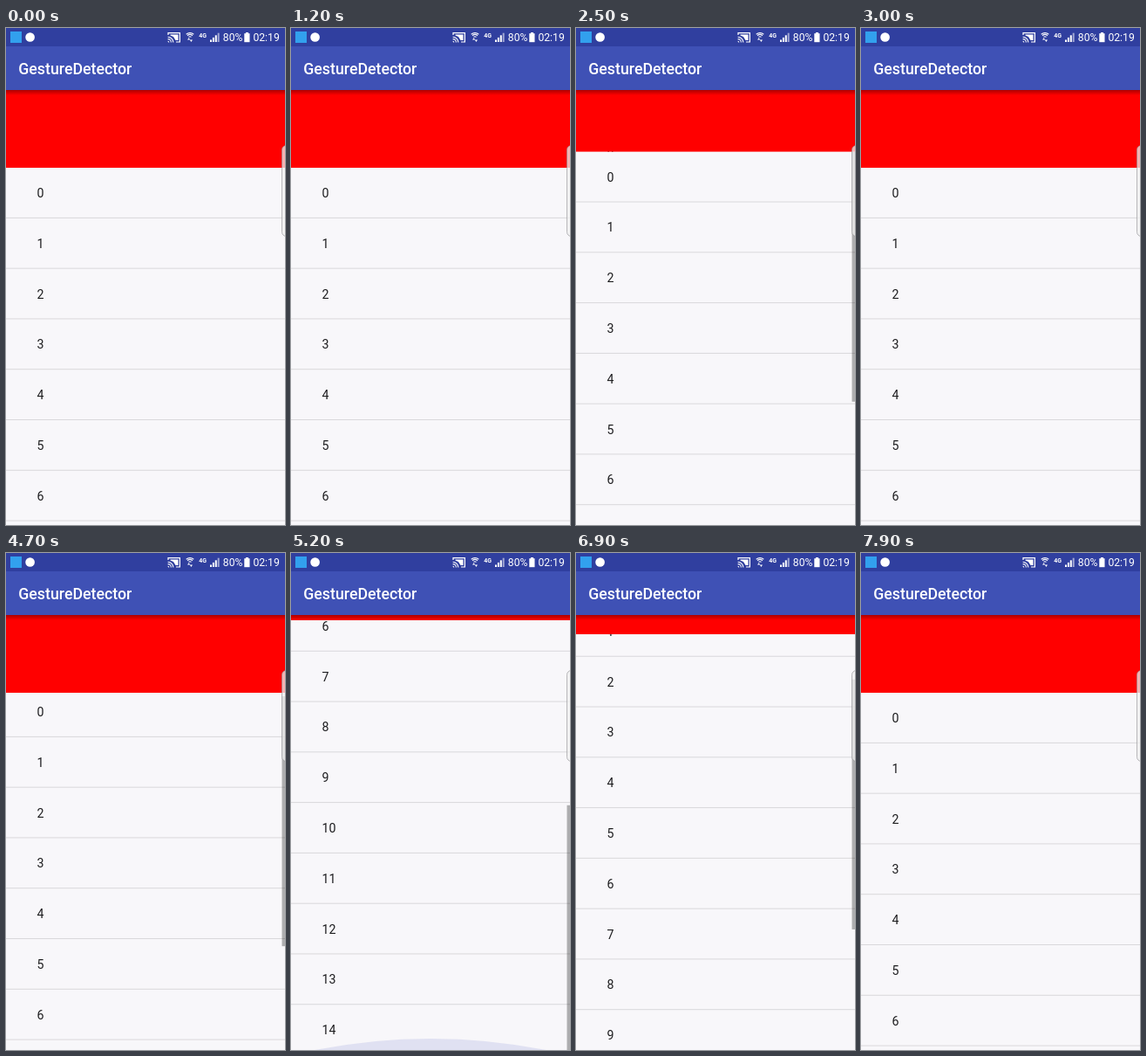
Write an HTML page with a canvas that moves like this. It is 320 px wide and 569 px high and loops after 8000 ms.

```html
<!DOCTYPE html>
<html lang="en">
<head>
<meta charset="utf-8">
<title>Collapsing header</title>
<style>
html, body { margin: 0; width: 100%; height: 100%; overflow: hidden; background: #f8f7fa; }
canvas { display: block; }
</style>
</head>
<body>
<canvas id="stage" width="320" height="569"></canvas>
<script>
const ctx = document.getElementById('stage').getContext('2d');
const W = 320, H = 569, LOOP = 8000, STEP = 100;
const BAR = 71, OPEN = 160, ROW = 57.78, ROWS = 15;
const VIEW = H - BAR, CONTENT = ROW * ROWS, MAX = CONTENT - VIEW;

const linear = p => p;
const smooth = p => (1 - Math.cos(Math.PI * p)) / 2;

// Each key is [time, value]
const HEADER = [[1255, OPEN], [1755, BAR], [2150, BAR], [2650, OPEN],
  [4783, OPEN], [5283, BAR], [6734, BAR], [7234, OPEN]];
const SCROLL = [[1650, 0], [2000, 60], [2120, 60], [2350, 0],
  [4650, 0], [4700, 7], [4800, 60], [4900, 150], [5000, 260], [5100, 345], [5150, MAX],
  [6650, MAX], [6700, 360], [6800, 240], [6900, 90], [7000, 0]];
const THUMB = [[1200, 0], [1300, 1], [2650, 1], [2900, 0], [4650, 0], [4700, 1],
  [5700, 1], [5950, 0], [6650, 0], [6700, 1], [7580, 1], [7830, 0]];
const GLOW_BOTTOM = [[5140, 0], [5200, 1], [5300, 1.3], [5850, 0]];
const GLOW_TOP = [[6980, 0], [7100, 1], [7500, 0]];

function track(keys, t, ease = linear) {
  const i = keys.findIndex(k => k[0] > t);
  if (i === 0) return keys[0][1];
  if (i < 0) return keys[keys.length - 1][1];
  const [t0, a] = keys[i - 1], [t1, b] = keys[i];
  return a + (b - a) * ease((t - t0) / (t1 - t0));
}

function rect(x, y, w, h, color) {
  ctx.fillStyle = color;
  ctx.fillRect(x, y, w, h);
}

function text(str, x, y, font, color = '#fff') {
  ctx.font = font + ' Roboto, sans-serif';
  ctx.fillStyle = color;
  ctx.fillText(str, x, y);
}

function arc(x, y, r, from, to, width) {
  ctx.beginPath();
  ctx.arc(x, y, r, from, to);
  ctx.strokeStyle = '#fff';
  ctx.lineWidth = width;
  ctx.stroke();
}

function polygon(color, ...points) {
  ctx.beginPath();
  points.forEach(p => ctx.lineTo(...p));
  ctx.fillStyle = color;
  ctx.fill();
}

function glow(y, direction, amount) {
  if (amount <= 0) return;
  ctx.beginPath();
  ctx.moveTo(0, y);
  ctx.quadraticCurveTo(W / 2, y + direction * 38 * amount, W, y);
  ctx.fillStyle = `rgba(63,81,181,${0.13 * Math.min(1, amount)})`;
  ctx.fill();
}

function list(t) {
  const top = track(HEADER, t, smooth), scroll = track(SCROLL, t);
  rect(0, BAR, W, top - BAR, '#f00');
  ctx.save();
  ctx.beginPath();
  ctx.rect(0, top, W, H - top);
  ctx.clip();
  rect(0, top, W, H, '#f8f7fa');
  for (let i = 0; i < ROWS; i++) {
    const y = top - scroll + i * ROW;
    text(i, 35.6, y + 34, '14.2px', '#1c1c1e');
    rect(0, y + ROW - 0.9, W, 1, '#d9d8db');
  }
  glow(top + VIEW, -1, track(GLOW_BOTTOM, t));
  glow(top, 1, track(GLOW_TOP, t));
  const scale = VIEW / CONTENT;
  rect(316.5, top + scroll * scale, 3.5, VIEW * scale, `rgba(0,0,0,${0.3 * track(THUMB, t)})`);
  ctx.restore();
}

function edgeHandle() {
  ctx.beginPath();
  ctx.roundRect(316.5, 134.5, 12, 104, 5);
  ctx.fillStyle = 'rgba(240,240,241,.75)';
  ctx.fill();
  ctx.strokeStyle = 'rgba(150,150,152,.65)';
  ctx.lineWidth = 1;
  ctx.stroke();
}

function appBar() {
  const shadow = ctx.createLinearGradient(0, BAR, 0, BAR + 6);
  shadow.addColorStop(0, 'rgba(0,0,0,.32)');
  shadow.addColorStop(1, 'rgba(0,0,0,0)');
  rect(0, BAR, W, 6, shadow);
  rect(0, 21, W, BAR - 21, '#3f51b5');
  text('GestureDetector', 14.2, 53, '500 17.78px');
}

function statusBar() {
  rect(0, 0, W, 21, '#303f9f');
  rect(5, 4, 13, 13, '#32a0ee');
  ctx.beginPath();
  ctx.arc(27.6, 10.5, 5.3, 0, 7);
  ctx.fillStyle = '#fff';
  ctx.fill();

  // Cast
  ctx.strokeStyle = '#fff';
  ctx.lineWidth = 1.2;
  ctx.beginPath();
  [[186, 8], [186, 5.6], [199.4, 5.6], [199.4, 16], [195, 16]].forEach(p => ctx.lineTo(...p));
  ctx.stroke();
  polygon('#fff', [188.5, 7.5], [197.5, 7.5], [197.5, 14], [194.5, 14], [192, 10], [188.5, 8.5]);
  for (const r of [1.2, 3.8, 6.2]) arc(185.6, 16.4, r, -Math.PI / 2, 0, 1.1);

  // Wi-Fi with traffic arrows
  for (const r of [2.2, 4.4, 6.4]) arc(211, 12, r, -2.3, -0.84, 1.1);
  polygon('#fff', [208, 13.4], [209.7, 11.2], [211.2, 13.4]);
  polygon('#fff', [210.8, 13.6], [214, 13.6], [212.4, 16]);

  text('4G', 221.3, 11, '700 7px');
  for (let i = 0; i < 4; i++) {
    rect(234 + i * 2.9, 13.5 - i * 2.6, 2, 2.5 + i * 2.6, i < 3 ? '#fff' : 'rgba(255,255,255,.55)');
  }
  text('80%', 248.8, 15.3, '12.2px');
  rect(275, 5, 3, 1.5, '#fff');
  rect(273.3, 6.2, 6.2, 10, '#fff');
  text('02:19', 283.4, 15.3, '12.2px');
}

function draw(now) {
  const t = Math.floor(now % LOOP / STEP) * STEP;
  list(t);
  edgeHandle();
  appBar();
  statusBar();
  requestAnimationFrame(draw);
}
requestAnimationFrame(draw);
</script>
</body>
</html>
```
